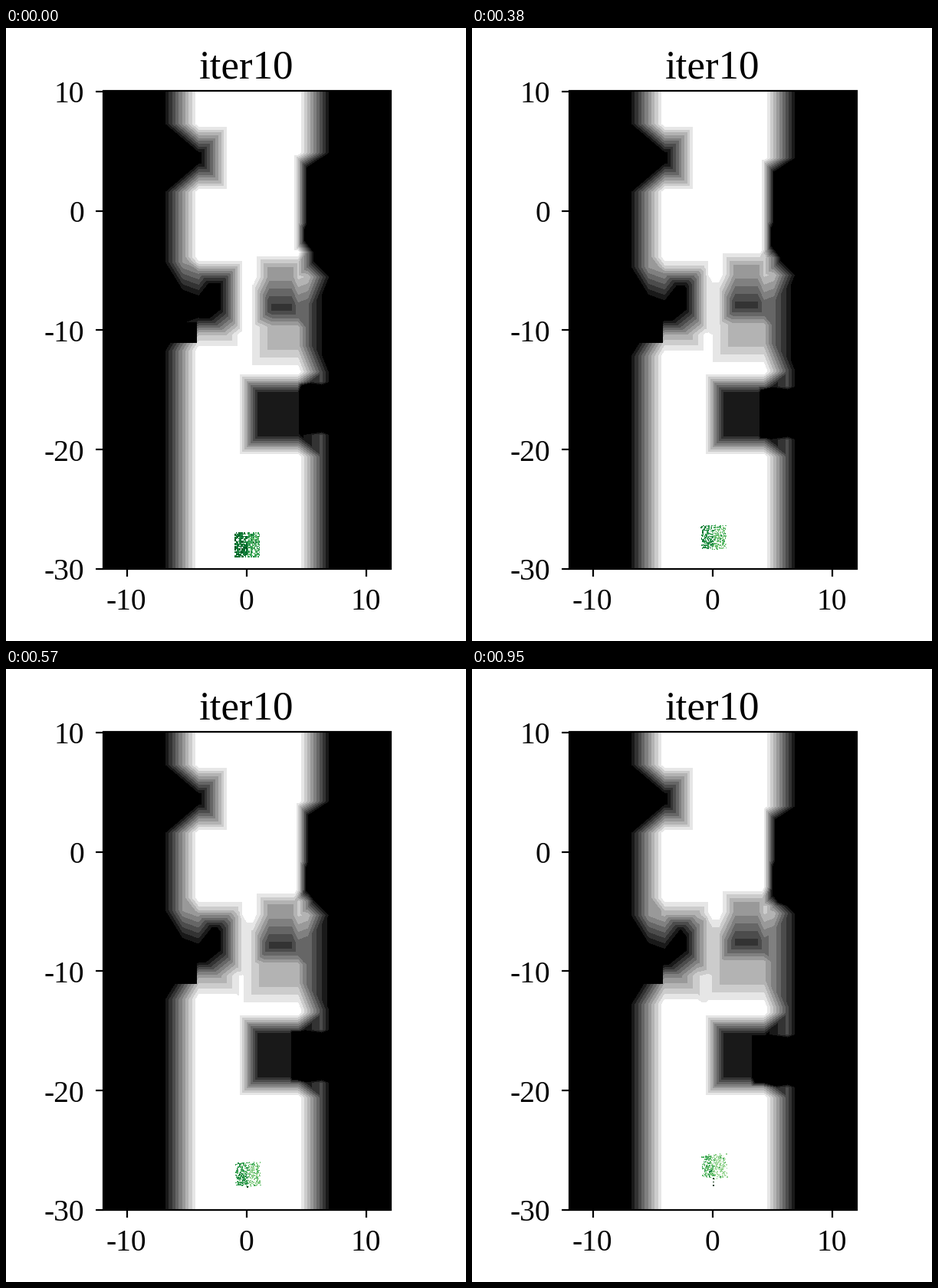
Animation of 600 by 800 pixels, one loop 1040 ms. Source, as a matplotlib script:

```python
import numpy as np
import matplotlib.pyplot as plt
from matplotlib.animation import FuncAnimation
from matplotlib.patches import Rectangle

W, H = 600, 800
TICK = 10                 # ms per animation frame
HOLD = 19                 # animation frames per pose
STEPS, TOTAL = 6, 104
X0, X1, Y0, Y1 = 127, 502, 82, 706
PT = 0.72                 # points per pixel at 100 dpi
LINE = 2.2 * PT

xx, yy = np.meshgrid(np.arange(X0, X1) + 0.5, np.arange(Y0, Y1) + 0.5)
walls = (np.clip((251.3 - xx) / 43.3, 0, 1)
         + np.clip((xx - 381) / 40, 0, 1))


def obstacle(x, y, half, fade, wide=1.0, peak=1.0):
    """Risk of a box that rises from its edge inwards, up to a plateau."""
    depth = np.minimum(half * wide - abs(xx - x), half - abs(yy - y))
    return np.clip(depth / fade, 0, peak)


def risk_map(t):
    risk = walls.copy()
    # parked boxes
    risk += obstacle(247.5, 169.5, half=44.3, fade=36.7)
    risk += obstacle(272, 349.5, half=51, fade=56, wide=0.82)
    risk += obstacle(357, 504, half=55, fade=29, peak=0.92)
    # drifting boxes
    risk += obstacle(438.4 + t, 228 + 3.3 * t, half=65, fade=26)
    risk += obstacle(415.5 + 0.8 * t, 289.5 - t, half=34.5, fade=40)
    risk += obstacle(358, 341.5 - 1.6 * t, half=48.5, fade=47,
                     wide=0.74, peak=0.45)
    risk += obstacle(373 - 3.5 * t, 387.5 - 1.6 * t, half=62, fade=100,
                     peak=0.36)
    risk += obstacle(250.5, 363.5 + 3.2 * t, half=58, fade=70)
    risk += obstacle(415 - 3.4 * t, 496.5 + 3 * t, half=34.5, fade=16)
    # hard-edged block
    risk[(xx < 249) & (abs(yy - 397.5) < 13.5)] = 1
    return 1 - np.minimum(np.floor(risk * 10 + 1e-6), 10) / 10


rng = np.random.default_rng(10)
side = np.linspace(0, 1, 22)
gx, gy = np.meshgrid(side, side)
keep = rng.random(gx.shape) < 0.74
u, v = gx[keep], gy[keep]
jitter = rng.normal(0, 0.012, (2, u.size))
tone = np.where(u < 0.48, 0.84, 0.64) + rng.normal(0, 0.08, u.size)
loner = rng.random(u.size) < 0.04


def particles(t):
    left, right = 299 + 0.7 * t, 330.5
    top, bottom = 659 - 4.7 * t, 690 - 5.4 * t
    x = left + (right - left) * (u + jitter[0] * t)
    y = top + (bottom - top) * (v + jitter[1] * t)
    tones = tone - 0.06 * t * ~loner
    # stragglers fall behind one after another
    late = bottom + 2 + 4.5 * np.arange(max(t - 2, 0))
    x = np.append(x, np.full(late.size, 315))
    y = np.append(y, late)
    tones = np.append(tones, np.ones(late.size))
    return np.column_stack([x, y]), plt.cm.Greens(np.clip(tones, 0.2, 1))


fig = plt.figure(figsize=(W / 100, H / 100), dpi=100, facecolor="white")
ax = fig.add_axes([0, 0, 1, 1])
poses = [(risk_map(t), *particles(t)) for t in range(STEPS)]
picture = ax.imshow(poses[0][0], cmap="gray", vmin=0, vmax=1, aspect="auto",
                    extent=(X0, X1, Y1, Y0), interpolation="nearest")
ax.set_xlim(0, W)
ax.set_ylim(H, 0)
ax.axis("off")
swarm = ax.scatter([], [], marker="s", s=(1.5 * PT) ** 2, linewidths=0,
                   zorder=3)
ax.add_patch(Rectangle((126.8, 82), 375, 624, fill=False, lw=LINE,
                       ec="black", joinstyle="miter", zorder=5))


def label(x, y, text, size, ha="center"):
    ax.text(x, y, text, fontsize=size * PT, family="Liberation Serif",
            ha=ha, va="baseline")


def tick(xs, ys):
    ax.plot(xs, ys, color="black", lw=LINE, solid_capstyle="butt")


for value in range(-30, 11, 10):
    y = 238.6 - 15.58 * value
    tick([117, 127], [y, y])
    label(102, y + 14.5, str(value), 39.5, "right")
for value in range(-10, 11, 10):
    x = 314 + 15.6 * value
    tick([x, x], [706, 716])
    label(x - 1, 759, str(value), 39.5)
label(313.5, 66, "iter10", 53)


def update(frame):
    image, points, colors = poses[min(frame // HOLD, STEPS - 1)]
    picture.set_data(image)
    swarm.set_offsets(points)
    swarm.set_facecolors(colors)
    return picture, swarm


anim = FuncAnimation(fig, update, frames=TOTAL, interval=TICK,
                     repeat=True, repeat_delay=0, blit=False)
plt.show()
```
